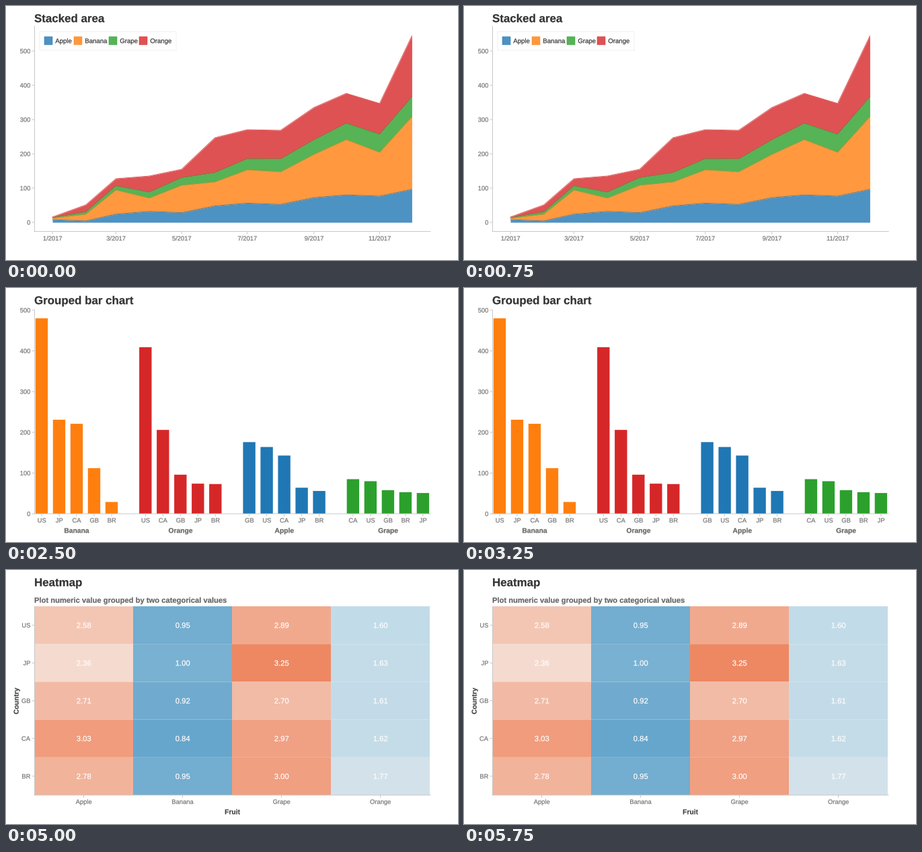
These frames come from a looping animation (672x378 px, 6250 ms). A matplotlib script:

```python
import numpy as np
import matplotlib.pyplot as plt
from matplotlib.animation import FuncAnimation
from matplotlib.colors import LinearSegmentedColormap
from matplotlib.patches import Circle, PathPatch, Rectangle
from matplotlib.textpath import TextPath
from matplotlib.transforms import Affine2D

W, H, DPI = 672, 378, 100
PX = 72 / DPI

plt.rcParams["path.snap"] = False
plt.rcParams["toolbar"] = "None"

COLORS = {"Apple": "#1f77b4", "Banana": "#ff7f0e",
          "Grape": "#2ca02c", "Orange": "#d62728"}
AXIS, TICK, DARK, MID = "#c8c8c8", "#757575", "#333333", "#666666"
SHIFT = {"left": 0, "center": 0.5, "right": 1}
LEFT, FLOOR, ZERO = 42.5, 335.5, 322
MONTHS = [f"{m}/2017" for m in range(1, 13, 2)]
MONTH_DAYS = np.cumsum([0, 31, 28, 31, 30, 31, 30, 31, 31, 30, 31, 30, 31])

fig = plt.figure(figsize=(W / DPI, H / DPI), dpi=DPI, facecolor="white")
ax = fig.add_axes([0, 0, 1, 1])


# ---------- drawing helpers, all in pixels ----------

def text(x, y, s, size=9.4, color=TICK, ha="center", bold=False, rot=0):
    """Text outlines whose capitals are vertically centred on y."""
    font = {"family": "Liberation Sans", "weight": "bold" if bold else "normal"}
    path = TextPath((0, 0), str(s), size=size, prop=font)
    width = path.get_extents().x1
    place = (Affine2D().translate(-SHIFT[ha] * width, -0.36 * size)
             .rotate_deg(rot).scale(1, -1).translate(x, y))
    ax.add_patch(PathPatch(place.transform_path(path), fc=color, ec=color,
                           lw=0.2 * PX))


def line(xs, ys, color=AXIS, width=1, alpha=1):
    ax.plot(xs, ys, color=color, lw=width * PX, alpha=alpha)


def rect(x, y, w, h, fill, alpha=1, edge=None, edge_alpha=0.5):
    ax.add_patch(Rectangle((x, y), w, h, fc=fill, alpha=alpha, lw=0))
    if edge:
        ax.add_patch(Rectangle((x, y), w, h, fill=False, ec=edge,
                               alpha=edge_alpha, lw=0.8 * PX))


def area(xs, top, bottom, color, alpha):
    ax.fill_between(xs, top, bottom, color=color, alpha=alpha, lw=0)


def title(s):
    text(42, 18, s, 16.9, DARK, "left", True)


def axes_lines(top=30, floor=FLOOR):
    line([LEFT, LEFT], [top, floor])
    line([42, 631], [floor, floor])


def y_ticks(labels, y0, step):
    for k, s in enumerate(labels):
        y = y0 - k * step
        line([39, LEFT], [y, y])
        text(36, y, s, ha="right")


def x_ticks(xs, labels, y=345.6, floor=FLOOR):
    for x, s in zip(xs, labels):
        line([x, x], [floor, floor + 3.5])
        text(x, y, s)


def legend(dx=0, dots=False, alpha=0.8, edge_alpha=0.6):
    rect(50 + dx, 38, 203, 28, "white", edge="#e8e8e8", edge_alpha=0.8)
    for (name, c), x in zip(COLORS.items(), (57, 101, 153, 198)):
        if dots:
            ax.add_patch(Circle((x + 6, 51.7), 3, fc=c, lw=0))
        else:
            rect(x + dx, 45.7, 12, 12, c, alpha, c, edge_alpha)
        text(x + 16.3 + dx, 51.7, name, 9.6, DARK, "left")


# ---------- the five charts ----------

def stacked_area():
    title("Stacked area")
    axes_lines()
    y_ticks(range(0, 600, 100), ZERO, 51)
    xs = 69 + 1.6 * MONTH_DAYS[:12]
    x_ticks(xs[::2], MONTHS)
    i = np.arange(12)
    apple = ZERO - 2 - 4.1 * i + 4 * np.cos(2 * np.pi * (i - 1) / 3)
    banana = np.array([316, 310, 274, 286, 267, 262, 244, 247, 221, 199, 218, 165])
    grape = banana - 1 - 2.6 * i
    orange = [314, 296, 257, 253, 243, 196, 184, 185, 151, 130, 145, 44.5]
    layers = list(zip(COLORS.values(), (apple, banana, grape, orange)))
    base = ZERO
    for c, top in layers:
        area(xs, top, base, c, 0.8)
        base = top
    for c, top in layers:
        line(xs, top, c, 0.9, 0.8)
    legend()


def cloud(rng, name, n, y, sd, size):
    """Dots around one level that crowd together as time goes on."""
    xs = 69 + 534 * np.sqrt(rng.random(n))
    ys = y + sd * np.clip(rng.normal(size=n), -2.3, 2.3)
    rs = np.clip(size * np.exp(0.48 * rng.normal(size=n)), 0.5, 2.8 * size)
    ax.scatter(xs, ys, s=(2 * rs * PX) ** 2, c=COLORS[name], lw=0)


def scatterplot():
    title("Scatterplot")
    axes_lines()
    y_ticks(("0.5", "1", "1.5", "2", "2.5"), 283.2, 59.1)
    x_ticks(56 + 1.5 * MONTH_DAYS[::2], MONTHS + ["1/2018"])
    rng = np.random.default_rng(17)
    cloud(rng, "Apple", 230, 224, 11.5, 1.1)
    cloud(rng, "Banana", 260, 313.3, 2.9, 1.55)
    cloud(rng, "Orange", 230, 283, 5.8, 1.35)
    cloud(rng, "Grape", 190, 105, 23, 0.82)
    legend(dots=True)


def grouped_bars():
    title("Grouped bar chart")
    groups = (
        ("Banana", "US JP CA GB BR", (480, 231, 221, 112, 29)),
        ("Orange", "US CA GB JP BR", (409, 206, 96, 74, 73)),
        ("Apple", "GB US CA JP BR", (176, 164, 143, 64, 56)),
        ("Grape", "CA US GB BR JP", (85, 80, 58, 53, 51)),
    )
    floor, unit = 336, 0.606
    for g, (name, codes, values) in enumerate(groups):
        x = 53 + 154.3 * g
        centres = x + 26 * np.arange(5)
        for cx, v in zip(centres, values):
            rect(cx - 9.2, floor - unit * v, 18.4, unit * v, COLORS[name])
        x_ticks(centres, codes.split(), floor=floor)
        text(x + 52, 360.7, name, 10.3, MID, bold=True)
    axes_lines(33, floor)
    y_ticks(range(0, 600, 100), floor, 100 * unit)


def density(name, x0, w, n, peak, mid, spread, power=2, ripple=0.1):
    """Bell-shaped histogram with uneven bars, under its smoothed curve."""
    c, unit = COLORS[name], 14.05
    j = np.arange(n)
    bell = np.exp(-0.5 * np.abs((j - mid) / spread) ** power)
    v = peak * (0.025 + bell * (1 - ripple * np.cos(np.pi * j)))
    for x, h in zip(x0 + w * j, unit * v):
        rect(x, ZERO - h, w, h, c, 0.3, c, 0.45)
    t = np.linspace(0, n, 200)
    kernel = np.exp(-0.5 * ((t[:, None] - j - 0.5) / 0.8) ** 2)
    ys = ZERO - unit * (kernel @ v) / (0.8 * np.sqrt(2 * np.pi))
    area(x0 + w * t, ys, ZERO, c, 0.2)
    line(x0 + w * t, ys, c, 0.8, 0.2)


def kde_histogram():
    title("KDE plot + Histogram")
    axes_lines()
    y_ticks(range(0, 25, 5), ZERO, 70.2)
    x_ticks(144 + 113.9 * np.arange(5), ("0.5", "1", "1.5", "2", "2.5"))
    for name, x in (("Banana", 104), ("Orange", 174)):
        area([x, 314, 357], [318, 320.3, 321.5], ZERO, COLORS[name], 0.2)
        line([x, 314, 357], [318, 320.3, 321.5], COLORS[name], 0.8, 0.25)
    line([69, 603], [ZERO, ZERO], COLORS["Orange"], 0.8, 0.3)
    density("Apple", 204.3, 9.95, 11, 3.5, 4.9, 2.7, 3.5)
    density("Banana", 68.4, 2.3, 16, 16, 7.9, 2.25, ripple=0.2)
    density("Grape", 356.5, 18.95, 13, 1.9, 6.8, 2.4, ripple=-0.12)
    density("Orange", 110.2, 4.6, 14, 8.1, 7.4, 2.15)
    legend(370, alpha=0.44, edge_alpha=0.4)


LOW, HIGH = 0.84, 3.25
STOPS = ((0.84, "#67a6cc"), (1.6, "#c2dbe8"), (2.07, "#f2f0ee"),
         (2.36, "#f5dacf"), (3.25, "#ee8862"))
HEAT = LinearSegmentedColormap.from_list(
    "heat", [((v - LOW) / (HIGH - LOW), c) for v, c in STOPS])


def heatmap():
    title("Heatmap")
    text(42, 44.7, "Plot numeric value grouped by two categorical values",
         11.2, MID, "left", True)
    rows = (("US", (2.58, 0.95, 2.89, 1.60)), ("JP", (2.36, 1.00, 3.25, 1.63)),
            ("GB", (2.71, 0.92, 2.70, 1.61)), ("CA", (3.03, 0.84, 2.97, 1.62)),
            ("BR", (2.78, 0.95, 3.00, 1.77)))
    w, h, floor = 147, 56.2, 335
    for r, (code, values) in enumerate(rows):
        y = 54 + r * h
        line([39, 42], [y + h / 2, y + h / 2])
        text(36, y + h / 2, code, ha="right")
        for c, v in enumerate(values):
            x = 42 + c * w
            rect(x, y, w, h, HEAT((v - LOW) / (HIGH - LOW)))
            text(x + w / 2, y + h / 2, f"{v:.2f}", 11.3, "white")
    axes_lines(54, floor)
    x_ticks(42 + w * (np.arange(4) + 0.5), COLORS, 344.7, floor)
    text(336.5, 359.7, "Fruit", 10.3, "#444444", bold=True)
    text(15, 195, "Country", 10.3, "#444444", bold=True, rot=90)


CHARTS = (stacked_area, scatterplot, grouped_bars, kde_histogram, heatmap)


def draw(i):
    ax.clear()
    ax.set_axis_off()
    ax.set_autoscale_on(False)
    ax.set_xlim(0, W)
    ax.set_ylim(H, 0)
    CHARTS[i]()
    return ()


anim = FuncAnimation(fig, draw, frames=len(CHARTS), interval=1250,
                     repeat=True, repeat_delay=0, blit=False)
plt.show()
```
